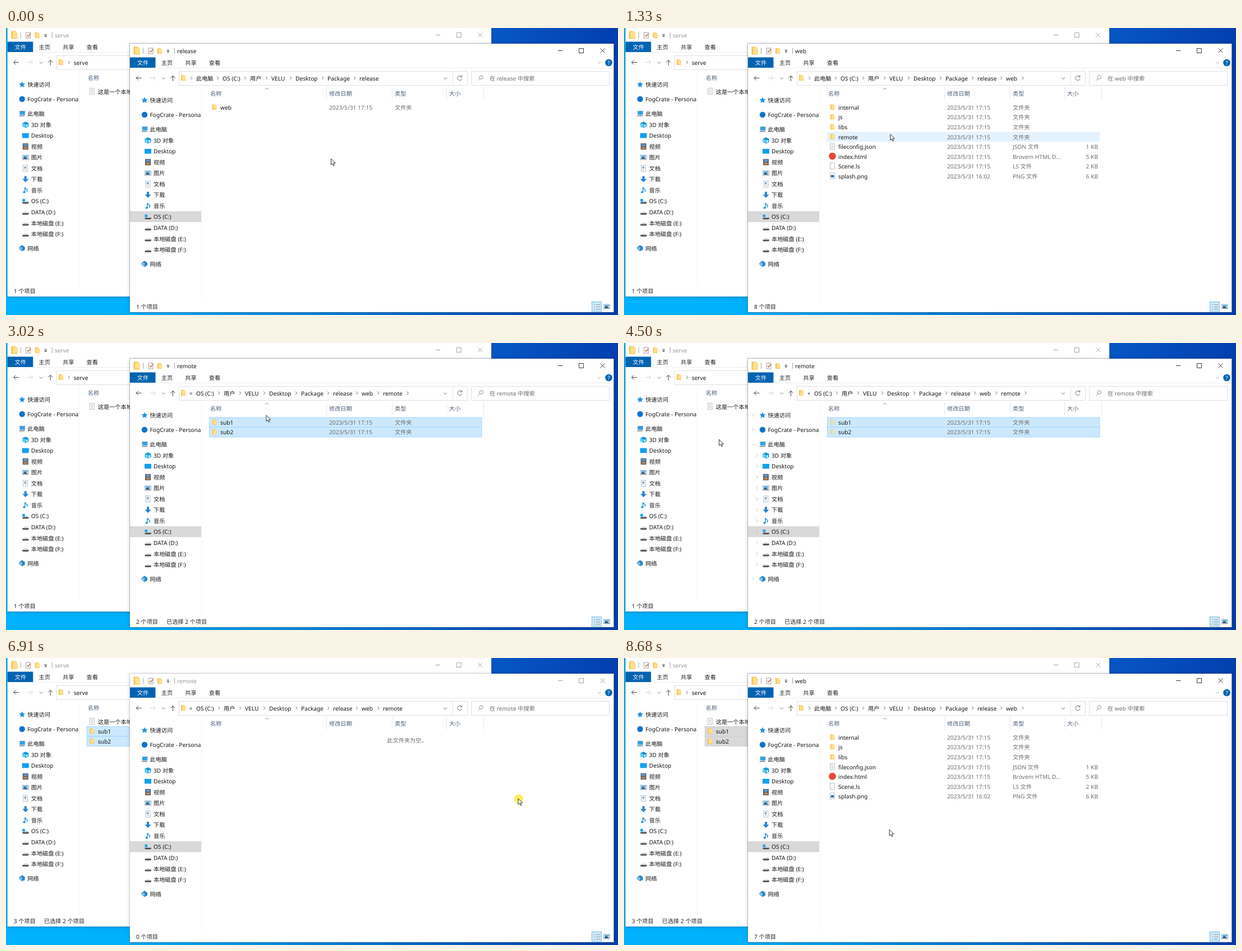
An HTML page that plays this animation: 1091x513 px, repeating every 9690 ms.

```html
<!DOCTYPE html>
<html lang="zh-CN">
<head>
<meta charset="utf-8">
<title>移动文件夹</title>
<style>
html, body { margin: 0; width: 100%; height: 100%; overflow: hidden; background: #0a4fbe; }
svg { display: block; }
text { font: 10.2px "Noto Sans", "Noto Sans CJK SC", "Noto Sans CJK", sans-serif; white-space: pre; text-rendering: geometricPrecision; }
.win { filter: drop-shadow(0 1px 3px rgba(0, 0, 0, .2)); }
</style>
</head>
<body>
<svg id="stage" width="1091" height="513" viewBox="0 0 1091 513">
  <defs>
    <linearGradient id="sky">
      <stop offset="0" stop-color="#00b2fc"/><stop offset=".22" stop-color="#00b0fb"/>
      <stop offset=".5" stop-color="#0087e2"/><stop offset=".79" stop-color="#0757c6"/>
      <stop offset="1" stop-color="#033fae"/>
    </linearGradient>
  </defs>
  <rect width="1091" height="513" fill="url(#sky)"/>
  <g id="windows"></g>
  <g id="pointer"></g>
</svg>
<script>
const LOOP = 9690;
const byId = id => document.getElementById(id);

// Bursts of screen updates: first time, last time, count
const bursts = [
  [0, 0, 1], [90, 1030, 13], [1170, 1330, 3], [1400, 1400, 1], [1630, 1960, 5],
  [2180, 2560, 6], [2640, 2870, 4], [3020, 3020, 1], [3810, 3810, 1],
  [4040, 4500, 7], [4570, 4970, 6], [5050, 5120, 2], [5750, 5750, 1], [5980, 5980, 1],
  [6130, 6910, 11], [7000, 7080, 2], [7140, 7460, 5], [7610, 7690, 2],
  [7840, 8160, 5], [8240, 8680, 7]
];
const ticks = bursts.flatMap(([a, b, n]) =>
  Array.from({ length: n }, (_, i) => Math.round(a + (n > 1 ? i * (b - a) / (n - 1) : 0))));

// Pointer path: time, x, y
const path = [
  [0, 579.5, 233.7], [30, 579.5, 233.7], [600, 462, 144], [1120, 462, 144], [1330, 474.7, 189.7], [1400, 475, 193],
  [2120, 475, 193], [2330, 462, 203], [2400, 462, 203], [2560, 462, 172], [2870, 464, 129],
  [3980, 464, 129], [4500, 169.5, 172.5], [4650, 170, 173], [4970, 231, 167], [5050, 229, 167], [5120, 227, 167],
  [6060, 227, 167], [6750, 913, 251], [7080, 913, 251], [7300, 700, 135], [7380, 574, 108], [7460, 646, 90],
  [7920, 646, 90], [8160, 591.5, 157], [8400, 535, 200], [8680, 473, 306.7], [LOOP, 473, 306.7]
];
const presses = [[690, 770], [850, 930], [1630, 1710], [1780, 1870], [2400, 3020],
  [4570, 4650], [6820, 7000], [7610, 7690]];
const within = (t, a, b) => t >= a && t < b;

function pointerAt(t) {
  const i = path.findIndex(p => p[0] > t);
  const [a, b] = [path[i - 1], path[i]];
  const k = (t - a[0]) / (b[0] - a[0]);
  const e = k * k * (3 - 2 * k);
  return [a[1] + (b[1] - a[1]) * e, a[2] + (b[2] - a[2]) * e];
}

// Drawing helpers
const text = (x, y, s, fill = '#161616', more = '') =>
  `<text x="${x}" y="${y + 4.1}" fill="${fill}" ${more}>${s}</text>`;
const box = (x, y, w, h, fill, stroke = 'none', width = 1) =>
  `<rect x="${x}" y="${y}" width="${w}" height="${h}" fill="${fill}" stroke="${stroke}" stroke-width="${width}"/>`;
const line = (d, color = '#555', w = .9) =>
  `<path d="${d}" fill="none" stroke="${color}" stroke-width="${w}"/>`;
const fillPath = (d, color) => `<path d="${d}" fill="${color}"/>`;
const dot = (r, color) => `<circle r="${r}" fill="${color}"/>`;
const at = (x, y, body, scale = 1, alpha = 1) =>
  `<g transform="translate(${x} ${y}) scale(${scale})" opacity="${alpha}">${body}</g>`;
const chevron = (x, y, color = '#555', turn = 0) =>
  `<g transform="translate(${x} ${y}) rotate(${turn})">${line('M-1.3-2.7L1.4 0L-1.3 2.7', color)}</g>`;

const drive = fillPath('M-5.5 2L-2-.5H4L6 2Z', '#d3d6d9') + fillPath('M-5.5 2H6V3.5L4.5 4.8H-4.5L-5.5 3.8Z', '#4d5155');
const sheet = box(-4, -5.5, 8, 11, '#fff', '#b0b0b0', .8);
const lines = line('M-2-2.5H2M-2 0H2M-2 2.5H2', '#a0a8b0', .8);
const picture = box(-5.5, -4, 11, 8, '#f4f8fb', '#8a98a4', .8) + box(-4, -3, 8, 3, '#5aaee8') + fillPath('M-4 3V1L-1-1L4 2V3Z', '#2d5a78');
const icons = {
  folder: fillPath('M-4-5H2V-3H4V5H-4Z', '#f2c55c') + fillPath('M-2-4H3.5V4H-2Z', '#ffe08a'),
  star: fillPath('M0-5.5L1.7-2L5.5-1.5L2.6 1L3.5 5L0 3L-3.5 5L-2.6 1L-5.5-1.5L-1.7-2Z', '#2490df'),
  cloud: dot(5.2, '#1272cc'),
  pc: box(-4, -4.5, 9, 6.5, '#2ba3ea', '#8aa0ae', .8) + fillPath('M-6 5L-4 3H5L4 5Z', '#8fa0ac'),
  cube: fillPath('M-5.5-3L0-5.5L5.5-3V3L0 5.5L-5.5 3Z', '#1593d8') + fillPath('M-5.5-3L0-1V5.5L-5.5 3Z', '#5ed0f5') + fillPath('M1 0L4-1V2.5L1 4Z', '#d8f4ff'),
  desktop: box(-6, -4.3, 12, 8.6, '#12a0ee'),
  video: box(-5, -5.5, 10, 11, '#3b4046') + box(-3, -4.5, 6, 4, '#5a9ede') + box(-3, .5, 6, 4, '#c08a55') + line('M-4-5V5M4-5V5', '#aaa', .7),
  picture,
  doc: sheet + lines + box(-2, -3, 3, 3, '#5b9bd0'),
  down: fillPath('M-2-5.5H2V-.5H5.5L0 5.5L-5.5-.5H-2Z', '#2b83d3'),
  music: line('M-1 3V-5Q0-2 3-1Q4 1 2 3', '#1b8fe0', 1.4) + `<ellipse cx="-2.3" cy="3.6" rx="2.2" ry="1.7" fill="#1b8fe0"/>`,
  os: drive + box(-5.5, -3.8, 4.6, 4.6, '#18a0ec'),
  drive,
  net: fillPath('M-6-1L0-5.5L5-2V3L0 5.5L-5 2Z', '#2f86c6') + fillPath('M-6-1L0-2V4L-5 2Z', '#7cc3ea'),
  text: sheet + lines,
  blank: sheet,
  page: dot(6.4, '#e34a3a'),
  image: sheet + box(-2.8, -1.5, 5.6, 4.5, '#2f78b8')
};

const nav = [
  ['star', '快速访问', 129], ['cloud', 'FogCrate - Persona', 155], ['pc', '此电脑', 181],
  ['cube', '3D 对象', 201], ['desktop', 'Desktop', 220.3], ['video', '视频', 239.8],
  ['picture', '图片', 259.3], ['doc', '文档', 278.8], ['down', '下载', 298.3], ['music', '音乐', 317.8],
  ['os', 'OS (C:)', 337.3], ['drive', 'DATA (D:)', 357], ['drive', '本地磁盘 (E:)', 376.5],
  ['drive', '本地磁盘 (F:)', 396], ['net', '网络', 421.5]
];
const crumbs = [['此电脑', 339], ['OS (C:)', 386], ['用户', 435], ['VELU', 473], ['Desktop', 516],
  ['Package', 573], ['release', 630], ['web', 681], ['remote', 719]];
const tails = { release: 672, web: 711, remote: 763, serve: 373 };

const ROW = 17.55, TOP = 133;
const day = '2023/5/31 ';
const dir = (name, time = '17:15') => ['folder', name, day + time, '文件夹', ''];
const webFiles = [
  ['text', 'fileconfig.json', day + '17:15', 'JSON 文件', '1 KB'],
  ['page', 'index.html', day + '17:15', 'Brovem HTML D...', '5 KB'],
  ['blank', 'Scene.ls', day + '17:15', 'LS 文件', '2 KB'],
  ['image', 'splash.png', day + '16:02', 'PNG 文件', '6 KB']
];
const webDirs = ['internal', 'js', 'libs'].map(n => dir(n));
const subs = ['sub1', 'sub2'];
const note = ['text', '这是一个本地服务器.txt', day + '17:16', '文本文档', '1 KB'];

function titleBar(w) {
  const ink = w.active ? '#161616' : '#999';
  return at(233, 40.5, icons.folder, 1.4) + line('M244.5 35.5V46M300.5 35.5V46', '#999') +
    at(258, 41, box(-4, -5, 8, 10, '#fff', '#888', .8) + line('M-2 0L0 2L4-3', '#c0652c', 1.3)) +
    at(274, 41, icons.folder) + line('M286.5 39.5H291', '#333') + fillPath('M286.5 41.5H291.5L289 44Z', '#333') +
    text(305, 40.5, w.title, ink) +
    line('M984 40.5H992.5M1021.5 36.5H1029.5V44.5H1021.5ZM1059.5 36.5L1067.5 44.5M1067.5 36.5L1059.5 44.5', w.active ? '#222' : '#999') +
    box(221, 52.5, 45.5, 18.5, '#0063b1') +
    ['文件', '主页', '共享', '查看'].map((s, i) =>
      text([244, 287, 329.5, 372][i], 62, s, i ? '#222' : '#fff', 'text-anchor="middle"')).join('') +
    line('M266 71.5H1083', '#ececec') + chevron(1058, 62, '#999', 90) +
    at(1074.5, 62, dot(6.3, '#0063b1')) + text(1074.5, 62, '?', '#fff', 'text-anchor="middle" font-weight="bold"');
}

function addressBar(w) {
  let s = line('M232 89.5H241.5M236 85.5L232 89.5L236 93.5M297.5 95V85.5M293.5 89.5L297.5 85.5L301.5 89.5', '#444', 1) +
    line('M256.5 89.5H266M262 85.5L266 89.5L262 93.5', '#d0d0d0') + chevron(281, 90, '#666', 90) +
    box(308.5, 77.5, 514, 25, '#fff', '#d9d9d9', .8) + line('M796.5 78V103', '#e2e2e2') +
    at(316, 89, icons.folder) + chevron(783, 90, '#555', 90) +
    line('M812.3 87A4.1 4.1 0 1 0 813 90.5M812.8 84.5V87.5H809.8', '#666') +
    box(829.5, 77.5, 246, 25, '#fff', '#d9d9d9', .8) +
    line('M841.5 94L845 90.5', '#888') + at(847.3, 88.2, '<circle r="3.2" fill="none" stroke="#888" stroke-width=".9"/>') +
    text(862, 89.5, `在 ${w.title} 中搜索`, '#6d6d6d');
  if (w.title === 'serve') {
    s += chevron(330.5, 89.5) + text(339, 89.5, 'serve');
  } else {
    const deep = w.title === 'remote';
    const last = crumbs.findIndex(c => c[0] === w.title);
    crumbs.slice(deep ? 1 : 0, last + 1).forEach(([name, x0], i) => {
      const x = x0 - (deep ? 47 : 0);
      if (name === w.hot) {
        const width = name === 'web' ? 36.5 : 52;
        s += box(x - 3, 77.5, width, 25, '#e5f3ff', '#cfe8fb') + line(`M${x + width - 18} 78V103`, '#cfe8fb');
      }
      s += (deep && !i ? text(327, 89, '«', '#444') : chevron(x - 8.5, 89.5)) + text(x, 89.5, name);
    });
  }
  return s + (w.tail ? chevron(tails[w.title] - (w.title === 'remote' ? 47 : 0), 89.5) : '');
}

function navPane(w) {
  const rows = nav.map(([icon, name, y], i) => {
    const inner = i > 2 && i < 14;
    return (w.arrows ? chevron(inner ? 237 : 230, y, '#bbb', i === 2 ? 90 : 0) : '') +
      at(inner ? 253 : 247, y, icons[icon]) + text(inner ? 263 : 256.5, y, name);
  }).join('');
  return (w.title === 'serve' ? '' : box(221, 327.5, 127, 19.5, '#d9d9d9')) + rows +
    box(348.5, 104, 734, 384, '#fff') + line('M349 105V487', '#f4f4f4');
}

function fileList(w) {
  const heads = [['名称', 364], ['修改日期', 576], ['类型', 693], ['大小', 790]];
  let s = heads.map(([name, x]) => text(x, 117, name, '#4c607a')).join('') +
    line('M571.5 106V128M688.5 106V128M785.5 106V128M851.5 106V128', '#e5e5e5') + chevron(465, 108.5, '#777', -90);
  w.items.forEach(([icon, name, date, type, size], i) => {
    const top = TOP + i * ROW, y = top + 8.8;
    if (w.sel.includes(name)) {
      s += box(362.5, top, 485.5, ROW, w.dim ? '#d9d9d9' : '#cce8ff', w.dim ? '#cecece' : '#99d1ff', .8);
    } else if (i === w.hover) {
      s += box(362, top, 486, ROW, '#e5f3ff');
    }
    s += at(371.5, y - .5, icons[icon], icon === 'folder' ? .95 : 1, w.cut ? .5 : 1) + text(382, y, name) +
      text(576, y, date, '#6d6d6d') + text(693, y, type, '#6d6d6d') + text(845, y, size, '#6d6d6d', 'text-anchor="end"');
  });
  return s + (w.items.length ? '' : text(715, 146.5, '此文件夹为空。', '#6d6d6d', 'text-anchor="middle"'));
}

function statusBar(w) {
  const n = w.sel.length;
  return text(232, 498, `${w.items.length} 个项目`, '#222') +
    (n ? text(286, 498, `${n > 1 ? '已选择' : '选中'} ${n} 个项目`, '#222') : '') +
    box(1044.3, 489.5, 17, 17.3, '#cfe9fb', '#5fb0de', .8) +
    line('M1048 494.5H1050M1048 498.5H1050M1048 502.5H1050M1052 494.5H1059M1052 498.5H1059M1052 502.5H1059', '#7d8690', .8) +
    at(1071, 498, picture);
}

const win = (w, dx = 0, dy = 0) =>
  `<g transform="translate(${dx} ${dy})"><g class="win">${box(220.8, 28, 862.7, 480, '#fff')}</g>` +
  box(220.5, 27.7, 863.3, 480.6, 'none', `rgba(20,40,70,${w.active ? .45 : .25})`, .6) +
  titleBar(w) + addressBar(w) + navPane(w) + fileList(w) + statusBar(w) + '</g>';

function mainWindow(t, [x, y], dragging) {
  const w = { title: 'web', items: [], sel: [], hot: '', cut: false };
  if (t < 930) {
    w.title = 'release';
    w.items = [dir('web')];
    if (t >= 690) w.sel = ['web'];
  } else if (t < 1870) {
    w.items = [...webDirs, dir('remote'), ...webFiles];
    w.tail = t >= 1170;
    if (t >= 1630) w.sel = ['remote'];
  } else if (t < 7840) {
    w.title = 'remote';
    w.tail = within(t, 2180, 5750);
    w.cut = t >= 3810;
    if (t < 5750) w.items = subs.map(n => dir(n));
    if (dragging) w.sel = subs.filter((_, i) => y < TOP + (i + 1) * ROW);
    else if (within(t, 3020, 5750)) w.sel = subs;
    if (t >= 7460) w.hot = 'web';
  } else {
    const removed = t >= 8450;
    w.items = [...webDirs, ...(removed ? [] : [dir('remote', '17:19')]), ...webFiles];
    w.sel = removed ? [] : ['remote'];
    w.tail = t >= 8300;
    if (t < 8240) w.hot = 'release';
  }
  w.active = !within(t, 4650, 6990);
  w.dim = !w.active;
  w.arrows = within(t, 4270, 4730);
  w.hover = !dragging && !within(t, 4650, 6910) && x > 362 && x < 848 ? Math.floor((y - TOP) / ROW) : -1;
  return w;
}

function serveWindow(t) {
  const pasted = t >= 5750;
  return {
    title: 'serve', items: pasted ? [note, ...subs.map(n => dir(n))] : [note],
    sel: pasted ? subs : [], active: within(t, 4650, 6900), dim: t >= 6990,
    tail: within(t, 4650, 5980), hover: -1
  };
}

function render(t) {
  const pos = pointerAt(t), [x, y] = pos;
  const dragging = within(t, 2400, 3020);
  const layers = [win(serveWindow(t), -218.3, -28), win(mainWindow(t, pos, dragging))];
  if (within(t, 4650, 6910)) layers.reverse();
  byId('windows').innerHTML = layers.join('');

  const band = dragging && y < 203 ? box(462, y, Math.max(1.2, x - 462), 203 - y, '#0078d7') : '';
  const glow = presses.some(p => within(t, ...p)) ? at(x + 1, y + 1, dot(8, '#ffee3c'), 1, .85) : '';
  const arrow = '<path d="M0 0V10.8L2.5 8.6L4.3 12.6L6 11.9L4.3 8H7.8Z" fill="#fff" stroke="#222" stroke-width=".9"/>';
  byId('pointer').innerHTML = band + glow + at(x, y, arrow);
}

let shown = -1;
const start = performance.now();
function frame() {
  const t = Math.max(0, performance.now() - start) % LOOP;
  const tick = ticks.findLast(v => v <= t);
  if (tick !== shown) render(shown = tick);
  requestAnimationFrame(frame);
}
frame();
</script>
</body>
</html>
```
